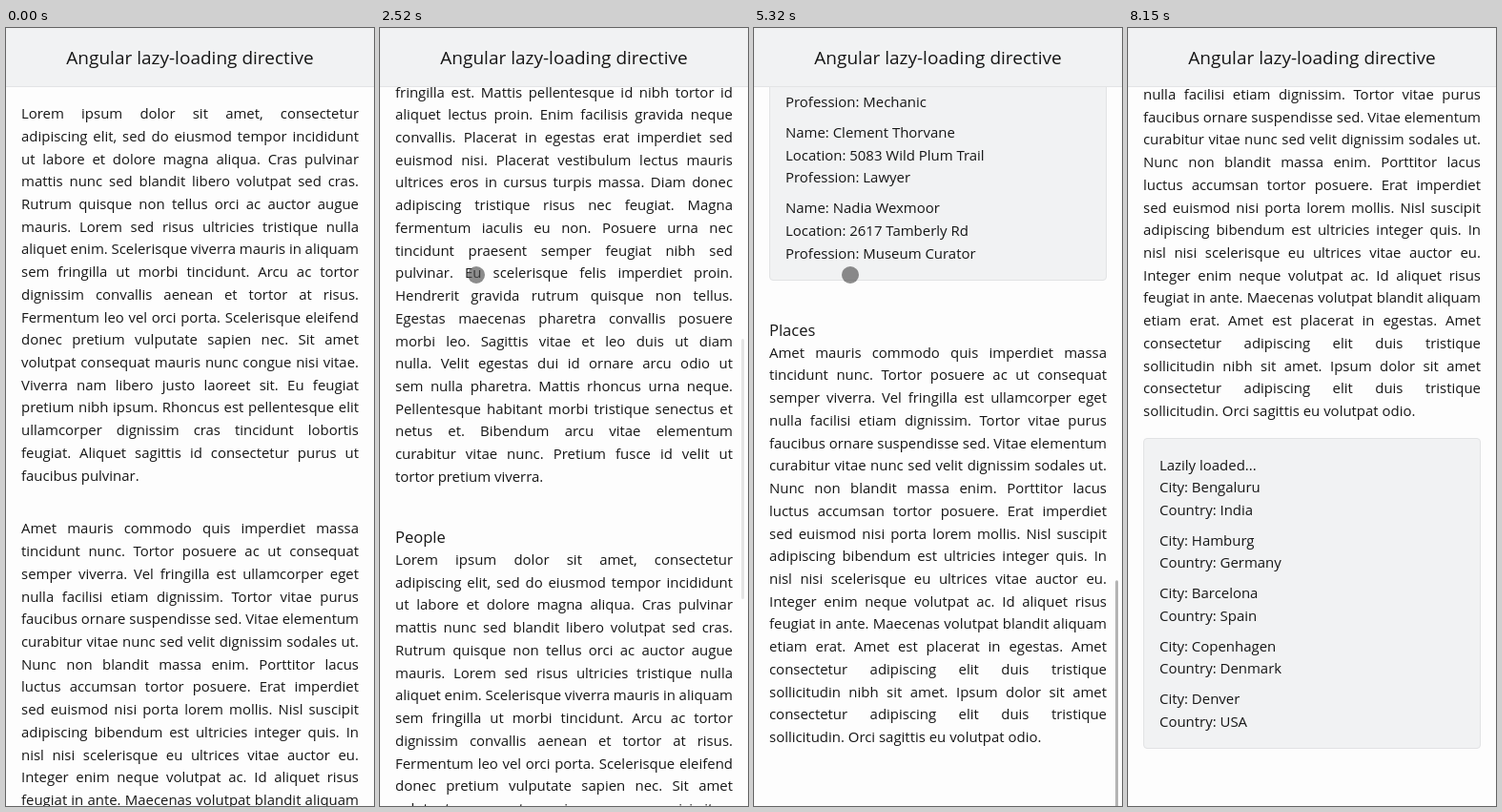
Animation, 386 px wide and 816 px high, one loop 8530 ms. Source, as an HTML page:

```html
<!DOCTYPE html>
<html lang="en">
<head>
<meta charset="utf-8">
<title>Angular lazy-loading directive</title>
<style>
  html, body { margin: 0; width: 100%; height: 100%; overflow: hidden; background: #fdfdfd; }
  body { position: relative; font: 14.95px/23.72px "Open Sans", "Noto Sans", sans-serif; color: #161616; }
  header {
    position: absolute; inset: 0 0 auto; height: 61px; line-height: 62px; z-index: 1;
    font-size: 19px; text-align: center; background: #f1f2f3; border-bottom: 1px solid #e3e4e5;
  }
  #page { position: absolute; left: 16px; top: 0; width: 354px; padding: 78.1px 0 61.1px; white-space: nowrap; }
  p { margin: 0; }
  p + p { margin-top: 32.1px; }
  p span { display: block; text-align-last: justify; word-spacing: -.4px; }
  p span:last-child { text-align-last: left; word-spacing: 0; }
  h2 { margin: 39.8px 0 0; font-size: 16.5px; font-weight: 400; line-height: inherit; }
  .box {
    margin: 15.8px 0 1.2px; padding: 16px; border: 1px solid #e1e2e4; border-radius: 4px; background: #f1f2f3;
  }
  .box div + div { margin-top: 8px; }
  #thumb { position: absolute; right: 4px; top: 0; width: 3px; border-radius: 2px; background: #b4b4b4; z-index: 2; }
  #touch {
    position: absolute; left: -9px; top: -9px; width: 18px; height: 18px; border-radius: 50%;
    background: rgba(75, 75, 75, .63); z-index: 3;
  }
</style>
</head>
<body>
<header>Angular lazy-loading directive</header>
<main id="page"></main>
<div id="thumb"></div>
<div id="touch"></div>
<script>
const LOREM = `Lorem ipsum dolor sit amet, consectetur
adipiscing elit, sed do eiusmod tempor incididunt
ut labore et dolore magna aliqua. Cras pulvinar
mattis nunc sed blandit libero volutpat sed cras.
Rutrum quisque non tellus orci ac auctor augue
mauris. Lorem sed risus ultricies tristique nulla
aliquet enim. Scelerisque viverra mauris in aliquam
sem fringilla ut morbi tincidunt. Arcu ac tortor
dignissim convallis aenean et tortor at risus.
Fermentum leo vel orci porta. Scelerisque eleifend
donec pretium vulputate sapien nec. Sit amet
volutpat consequat mauris nunc congue nisi vitae.
Viverra nam libero justo laoreet sit. Eu feugiat
pretium nibh ipsum. Rhoncus est pellentesque elit
ullamcorper dignissim cras tincidunt lobortis
feugiat. Aliquet sagittis id consectetur purus ut
faucibus pulvinar.`;

const AMET = `Amet mauris commodo quis imperdiet massa
tincidunt nunc. Tortor posuere ac ut consequat
semper viverra. Vel fringilla est ullamcorper eget
nulla facilisi etiam dignissim. Tortor vitae purus
faucibus ornare suspendisse sed. Vitae elementum
curabitur vitae nunc sed velit dignissim sodales ut.
Nunc non blandit massa enim. Porttitor lacus
luctus accumsan tortor posuere. Erat imperdiet
sed euismod nisi porta lorem mollis. Nisl suscipit
adipiscing bibendum est ultricies integer quis. In
nisl nisi scelerisque eu ultrices vitae auctor eu.
Integer enim neque volutpat ac. Id aliquet risus
feugiat in ante. Maecenas volutpat blandit aliquam
etiam erat. Amet est placerat in egestas. Amet
consectetur adipiscing elit duis tristique
sollicitudin nibh sit amet. Ipsum dolor sit amet
consectetur adipiscing elit duis tristique
sollicitudin. Orci sagittis eu volutpat odio.`;

const NON_NISI = `Non nisi est sit amet facilisis magna etiam. Nunc
scelerisque viverra mauris in aliquam sem. Purus
non enim praesent elementum facilisis leo vel
fringilla est. Mattis pellentesque id nibh tortor id
aliquet lectus proin. Enim facilisis gravida neque
convallis. Placerat in egestas erat imperdiet sed
euismod nisi. Placerat vestibulum lectus mauris
ultrices eros in cursus turpis massa. Diam donec
adipiscing tristique risus nec feugiat. Magna
fermentum iaculis eu non. Posuere urna nec
tincidunt praesent semper feugiat nibh sed
pulvinar. Eu scelerisque felis imperdiet proin.
Hendrerit gravida rutrum quisque non tellus.
Egestas maecenas pharetra convallis posuere
morbi leo. Sagittis vitae et leo duis ut diam
nulla. Velit egestas dui id ornare arcu odio ut
sem nulla pharetra. Mattis rhoncus urna neque.
Pellentesque habitant morbi tristique senectus et
netus et. Bibendum arcu vitae elementum
curabitur vitae nunc. Pretium fusce id velit ut
tortor pretium viverra.`;

const PEOPLE = [
  ["Norbert Hallowick", "3196 Fernmoor Rd", "Mechanic"],
  ["Clement Thorvane", "5083 Wild Plum Trail", "Lawyer"],
  ["Nadia Wexmoor", "2617 Tamberly Rd", "Museum Curator"],
];
const PLACES = [
  ["Bengaluru", "India"], ["Hamburg", "Germany"], ["Barcelona", "Spain"],
  ["Copenhagen", "Denmark"], ["Denver", "USA"],
];

const paragraph = text => `<p>${text.split("\n").map(line => `<span>${line}</span>`).join("")}</p>`;
const box = (id, labels, items) => `<div class="box" id="${id}">Lazily loaded...` + items.map(item =>
  `<div>${item.map((value, i) => `${labels[i]}: ${value}`).join("<br>")}</div>`).join("") + "</div>";

const $ = id => document.getElementById(id);
$("page").innerHTML = paragraph(LOREM) + paragraph(AMET) + paragraph(NON_NISI) +
  "<h2>People</h2>" + paragraph(LOREM) + box("people", ["Name", "Location", "Profession"], PEOPLE) +
  `<h2 id="heading">Places</h2>` + paragraph(AMET) + box("places", ["City", "Country"], PLACES);
const page = $("page"), people = $("people"), heading = $("heading"), places = $("places");
const thumb = $("thumb"), touch = $("touch");

const LOOP = 8530, STAGE = 816, VIEW = 833, NOTCH = 164.7, FADE = 300;
// Wheel stops: [time, position in notches]; fractions are where the page end stops the scroll.
const STOPS = [
  [0, 0], [1230, 1], [1310, 2], [1380, 3],
  [1970, 4], [2040, 5], [2110, 6], [2550, 7], [2720, 8],
  [4420, 9], [4520, 10], [5040, 11], [5210, 11.99],
  [6940, 12.99], [7010, 13.99], [7070, 14.07],
];
const FADES = [-FADE, 1680, 2320, 3050, 4820, 5640, 7410];

const clamp = x => Math.min(1, Math.max(0, x));

function drawTouch(t) {
  touch.style.display = t >= 1010 && t < 8150 ? "block" : "none";
  const leave = clamp((t - 7600) / 550);
  const [x, y] = t < 1080 ? [17, 31] : [101 - 52 * leave, 259 - 236 * leave];
  touch.style.transform = `translate(${x}px, ${y}px)`;
}

function draw(t) {
  people.style.display = t >= 4070 ? "block" : "none";
  people.style.opacity = t < 4120 ? .5 : 1;
  places.style.display = t >= 6460 ? "block" : "none";
  // The heading pushed down by the new box is repainted one notch late.
  heading.style.visibility = t >= 4070 && t < 4520 ? "hidden" : "visible";

  const [stopTime, notches] = STOPS.findLast(stop => stop[0] <= t);
  const scroll = Math.round(notches * NOTCH);
  page.style.transform = `translateY(${-scroll}px)`;

  const scale = STAGE / page.offsetHeight;
  const fadeStart = FADES.findLast(start => start <= t);
  thumb.style.height = VIEW * scale + "px";
  thumb.style.transform = `translateY(${2 + scroll * scale}px)`;
  thumb.style.opacity = stopTime > fadeStart && stopTime > 0 ? 1 : 1 - clamp((t - fadeStart) / FADE);

  drawTouch(t);
}

const begin = performance.now();
function tick() {
  draw((performance.now() - begin) % LOOP);
  requestAnimationFrame(tick);
}
tick();
</script>
</body>
</html>
```
